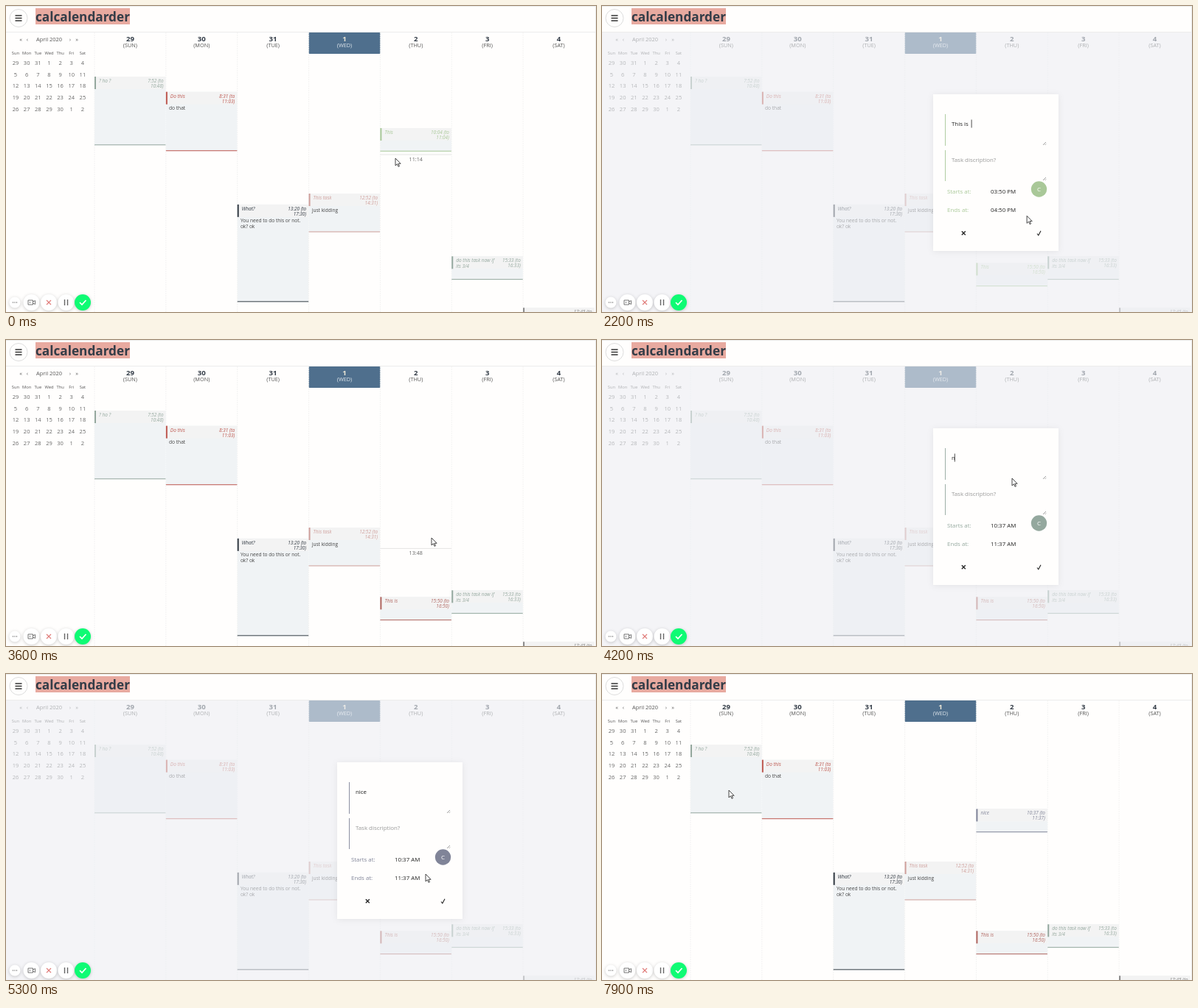
Animation, 800 px wide and 416 px high, one loop 8 s. Source, as an HTML page:

```html
<!DOCTYPE html>
<html lang="en">
<head>
<meta charset="utf-8">
<title>Calendar</title>
<style>
  html, body { margin: 0; width: 100%; height: 100%; overflow: hidden; background: #fffefd; }
  svg { display: block; width: 800px; height: 416px; font-family: "Open Sans", "Noto Sans", sans-serif; }
  .soft { filter: drop-shadow(0 1px 2px #0003); }
  .modal { filter: drop-shadow(0 1px 4px #0001); }
</style>
</head>
<body>
<svg viewBox="0 0 800 416"><g id="base"></g><g id="live"></g><g id="tools"></g></svg>
<script>
const LOOP = 8000, PX_PER_MIN = 0.53;
const $ = id => document.getElementById(id);
const colX = i => 120 + i * 96.85;
const minToY = m => 96 + (m - 472) * PX_PER_MIN;
const clock = m => `${Math.floor(m / 60)}:${String(m % 60).padStart(2, '0')}`;
const clamp = v => Math.max(0, Math.min(1, v));

const text = (x, y, s, size, fill, attrs = '') =>
  `<text x="${x}" y="${y}" font-size="${size}" fill="${fill}" ${attrs}>${s}</text>`;
const mid = (x, y, s, size, fill, attrs = '') => text(x, y, s, size, fill, 'text-anchor="middle" ' + attrs);
const rect = (x, y, w, h, fill, attrs = '') =>
  `<rect x="${x}" y="${y}" width="${w}" height="${h}" fill="${fill}" ${attrs}/>`;
const circle = (x, y, r, fill, attrs = '') => `<circle cx="${x}" cy="${y}" r="${r}" fill="${fill}" ${attrs}/>`;
const line = (d, color, w = 1, attrs = '') =>
  `<path d="${d}" fill="none" stroke="${color}" stroke-width="${w}" ${attrs}/>`;

const palette = `2f3c4c 94a89e f0d9cc e8aba2 b96058
  d2a6a3 b9a3ae a6d6c4 bed5aa 5f5653
  555a62 5bd3ae cf9f9b b0736f bd5570
  cbc050 76809c 947c98 808498 8fd9a0
  4a4a44 5c2e50 40384a 2f3c4c a9a868
  a8043c b5701e d6d84e 828282 fffefd`.split(/\s+/).map(c => '#' + c);
const GREEN = '#a9c898', SAGE = palette[1], RED = '#b0655f', SLATE = palette[18];

const tasks = [
  { col: 0, from: 472, to: 648, color: SAGE, title: ['? ho ?'] },
  { col: 1, from: 511, to: 663, color: '#bd574f', title: ['Do this'], body: ['do that'] },
  { col: 2, from: 800, to: 1050, color: '#333b44', title: ['What?'], body: ['You need to do this or not.', 'ok? ok'] },
  { col: 3, from: 772, to: 871, color: palette[12], title: ['This task'], body: ['just kidding'] },
  { col: 5, from: 933, to: 993, color: SAGE, title: ['do this task now if', 'its 3/4'] },
  { col: 6, from: 1065, to: 1125, color: '#888', title: [''] }
];

function drawTask({ col, from, to, color, title, body = [] }) {
  const x = colX(col), y = minToY(from), h = (to - from) * PX_PER_MIN;
  const italic = 'font-style="italic"';
  const times = [clock(from) + ' (to', clock(to) + ')'];
  return rect(x, y, 96.5, h, '#f0f3f5') + rect(x, y, 96.5, 17, '#f3f3f3') +
    rect(x, y, 2, 17, color) + rect(x, y + h - 1, 96.5, 1, color) +
    title.map((s, i) => text(x + 6, y + 8 + i * 7.5, s, 6.5, color, italic)).join('') +
    times.map((s, i) => text(x + 93.5, y + 8 + i * 7, s, 6.4, color, italic + ' text-anchor="end"')).join('') +
    body.map((s, i) => text(x + 4.2, y + 24.6 + i * 7.8, s, 6.6, '#444')).join('');
}

function drawBase() {
  let s = rect(0, 0, 800, 416, '#fffefd') + line('M0 .5H800M0 35.5H800M799.5 0V416', '#ececec');
  s += circle(17, 16.5, 12, '#fffefd', 'stroke="#ddd"') + line('M12.5 13h9m-9 3.5h9m-9 3.5h9', '#333', 1.3);
  s += rect(40, 3, 128, 22, '#e8aaa0') + text(40, 21, 'calcalendarder', 17.2, '#333c47', 'font-weight="700"');

  s += mid(58.5, 47.7, 'April 2020', 7.4, '#555');
  ['«', '‹', '›', '»'].forEach((c, i) => s += mid([20, 29, 87, 96][i], 47.5, c, 7.5, '#666'));
  'Sun Mon Tue Wed Thu Fri Sat'.split(' ').forEach((d, i) => s += mid(13 + i * 15.15, 65.5, d, 5.8, '#555'));
  for (let i = 0; i < 35; i++) {
    const day = i < 3 ? 29 + i : (i - 3) % 30 + 1;
    s += mid(13 + i % 7 * 15.15, 79.8 + Math.floor(i / 7) * 15.8, day, 7.5, '#666');
  }

  s += rect(colX(3), 36, 96.85, 29, '#4f6f8d');
  'SUN MON TUE WED THU FRI SAT'.split(' ').forEach((d, i) => {
    const x = colX(i), today = i === 3;
    s += line(`M${x} 36V416`, '#eee', .7, 'stroke-dasharray="2 1"');
    s += mid(x + 48.4, 47.5, [29, 30, 31, 1, 2, 3, 4][i], 9.6, today ? '#f0ead8' : '#333c47', 'font-weight="700"');
    s += mid(x + 48.4, 56, `(${d})`, 7.3, today ? '#dfe6ec' : '#555');
  });
  return s + tasks.map(drawTask).join('');
}

function drawTools() {
  const button = (x, r, fill = '#fff') => circle(x, 403, r, fill, 'class="soft"');
  return button(12, 7.5) + [9.5, 12, 14.5].map(x => circle(x, 403, .7, '#666')).join('') +
    button(34.5, 11) + line('M30 400h6.5v6h-6.5zm6.5 2 3-1.5v5l-3-1.5', '#666', .9) + circle(32.5, 403, .8, '#666') +
    button(58, 11) + line('M55 400l6 6m0-6-6 6', '#e07a78', 1.1) +
    button(81.5, 11) + line('M79.5 399v8m4-8v8', '#666', 1.4) +
    button(104, 11, '#0ffb74') + line('M100 403l3 3 5.5-6', '#fff', 1.7);
}

// Pointer tip: time, x, y
const path = [
  [0, 528, 207], [200, 535, 169], [650, 546.5, 353], [1900, 546.5, 353], [2400, 592, 249], [2550, 592, 249],
  [2700, 586, 253], [2900, 564, 212], [3000, 564, 212], [3200, 592, 306], [3350, 592, 306], [3600, 577, 269],
  [3850, 556, 188], [4450, 556, 188], [4600, 592, 249], [4680, 592, 249], [4800, 589, 244], [5000, 564, 240],
  [5100, 564, 240], [5300, 569, 272], [5500, 592, 308], [5650, 592, 308], [6400, 640, 270], [6800, 560, 290],
  [7300, 400, 200], [7700, 200, 165], [7900, 172, 158], [8000, 172, 158]
];

function pointer(t) {
  const i = Math.max(1, path.findIndex(p => p[0] >= t));
  const [t0, x0, y0] = path[i - 1], [t1, x1, y1] = path[i];
  let u = clamp((t - t0) / (t1 - t0));
  u *= u * (3 - 2 * u);
  return [x0 + (x1 - x0) * u, y0 + (y1 - y0) * u];
}

const fade = (t, a, b, c, d) => Math.min(clamp((t - a) / (b - a)), clamp((d - t) / (d - c)));
const typed = (s, t, start, step) => s.slice(0, Math.max(0, Math.floor((t - start) / step) + 1));

function thursdayTasks(t) {
  let from = 604;
  if (t >= 650) from = 950;
  else if (t > 200) from = Math.round(472 + (pointer(t)[1] - 4 - 96) / PX_PER_MIN);
  const saved = t >= 3250;
  const list = [{ col: 4, from, to: from + 60, color: saved ? RED : GREEN, title: [saved ? 'This is' : 'This'] }];
  if (t >= 5600) list.push({ col: 4, from: 637, to: 697, color: SLATE, title: ['nice'] });
  return list;
}

function drawHover(t, all) {
  if (t > 200 && t < 650) return '';
  const [x, py] = pointer(Math.max(0, t - 130));
  const y = py - 5, col = Math.floor((x - 120) / 96.85);
  if (all.some(k => k.col === col && y > minToY(k.from) - 2 && y < minToY(k.to))) return '';
  const m = Math.floor(472 + (y - 96) / PX_PER_MIN + 2.8);
  return line(`M${colX(col)} ${y}h96.5`, '#ddd', .8) + mid(colX(col) + 48.4, y + 9, clock(m), 7.2, '#666');
}

function drawModal(t, alpha, swatches) {
  const first = t < 3700;
  const title = first ? 'This' + typed(' is', t, 1500, 150) : typed('nice', t, 4200, 80);
  const color = first ? (t < 2920 ? GREEN : palette[13]) : (t < 5020 ? SAGE : SLATE);
  const [start, end] = first ? ['03:50 PM', '04:50 PM'] : ['10:37 AM', '11:37 AM'];
  const caret = t < 2400 || (t > 3700 && t < 4500);
  let s = rect(449, 120, 170, 213, '#fffefd', 'class="modal"');
  s += line('M465.5 147v43m0 6v42', color, .9) +
    line('M598 189l4-4m-1.5 4 1.5-1.5M598 237l4-4m-1.5 4 1.5-1.5', '#777', .7);
  s += text(474, 163, title, 7.9, '#222', 'xml:space="preserve"') + text(474, 211.5, 'Task discription?', 7.9, '#999');
  if (caret && Math.floor(t / 500) % 2 === 0) {
    const x = t < 1500 ? 474 : 474.5 + title.length * 3.8;
    s += line(`M${x} 154.5v11`, '#222', .8);
  }
  s += text(468, 255, 'Starts at:', 7.9, color) + text(468, 280.3, 'Ends at:', 7.9, color);
  s += text(527, 255, start, 7.9, '#222') + text(527, 280.3, end, 7.9, '#222');
  s += circle(592.5, 249, 10.7, color) + mid(592.5, 252, 'C', 8, '#fff');
  s += line('M487.8 306.3l5 5m0-5-5 5', '#222', 1.3) + line('M590 309.5l1.8 2.3 3.2-6', '#222', 1.1);
  if (swatches > 0) {
    s += `<g opacity="${swatches}">` + rect(449, 120, 170, 213, '#fffefd') + palette.map((c, i) =>
      circle(476 + i % 5 * 29.2, 152 + Math.floor(i / 5) * 29.2, 11.7, c, i === 29 ? 'stroke="#ddd" stroke-width=".7"' : '')
    ).join('') + '</g>';
  }
  return `<g opacity="${alpha}">${s}</g>`;
}

function drawPointer(t, hand) {
  const [x, y] = pointer(t);
  const shape = hand
    ? 'M-1.2 1a1.2 1.2 0 0 1 2.4 0v4l4.3 1v3.2l-1.4 3.8h-4.8l-4-5 1.1-1.2 2.4 1.6z'
    : 'M0 0v10l2.4-2.2 1.6 3.6 1.5-.7-1.6-3.4h3.2z';
  return `<path transform="translate(${x} ${y})" d="${shape}" fill="#fff" stroke="#333" stroke-width=".9"/>`;
}

function draw(t) {
  const shade = Math.max(fade(t, 800, 1000, 3250, 3450), fade(t, 3950, 4150, 5600, 5800));
  const swatches = Math.max(fade(t, 2450, 2740, 2920, 3050), fade(t, 4620, 4760, 5020, 5150));
  const thursday = thursdayTasks(t);
  let s = thursday.map(drawTask).join('');
  if (shade < .5) s += drawHover(t, tasks.concat(thursday));
  if (shade > 0) s += rect(0, 36, 800, 380, '#edeff3', `opacity="${shade * .6}"`) + drawModal(t, shade, swatches);
  return s + drawPointer(t, swatches > .5);
}

$('base').innerHTML = drawBase();
$('tools').innerHTML = drawTools();
const began = performance.now();
function tick() {
  $('live').innerHTML = draw((performance.now() - began) % LOOP);
  requestAnimationFrame(tick);
}
tick();
</script>
</body>
</html>
```
